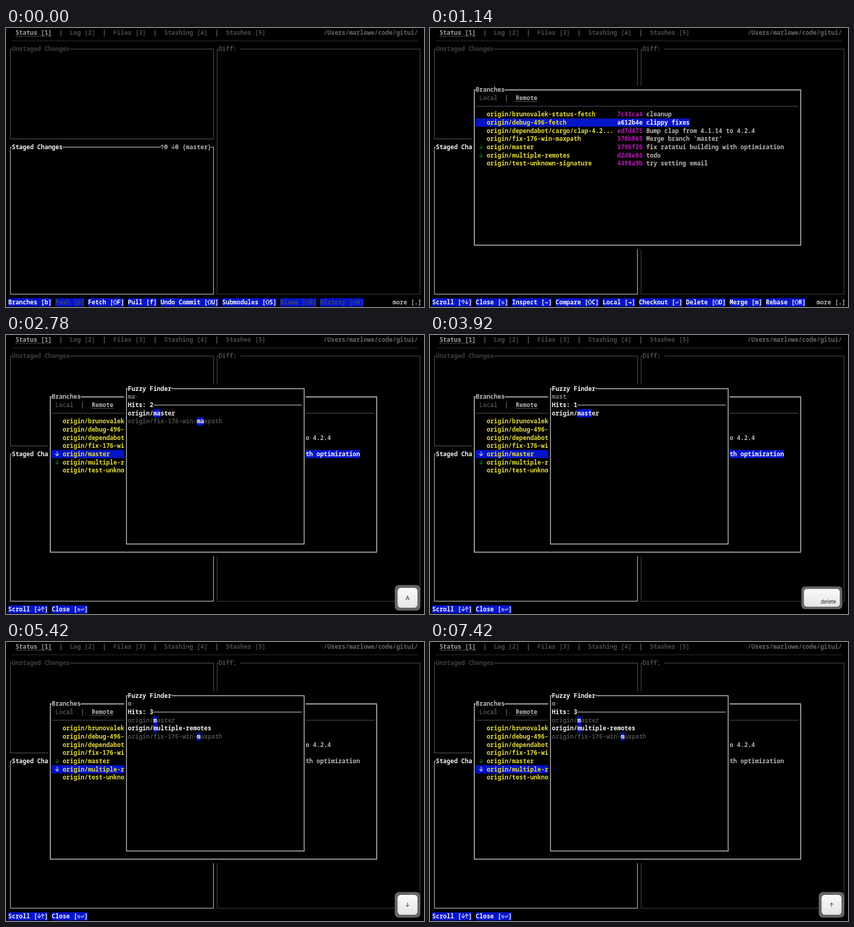
Animation of 800 by 534 pixels, one loop 8 s. Source, as an HTML page with a canvas:

```html
<!DOCTYPE html>
<html lang="en">
<head>
<meta charset="utf-8">
<title>Terminal branch finder</title>
<style>
html, body { margin: 0; width: 100%; height: 100%; overflow: hidden; background: #000; }
canvas { display: block; width: 800px; height: 534px; }
</style>
</head>
<body>
<canvas id="stage" width="800" height="534"></canvas>
<script>
const ctx = document.getElementById('stage').getContext('2d');
const LOOP = 8000, CW = 6.94, RH = 15.64, X0 = 4.3, Y0 = 9;
const MONO = '"Noto Sans Mono", "DejaVu Sans Mono", monospace';
const SYMBOLS = '"DejaVu Sans Mono", "DejaVu Sans", "Noto Sans Mono", monospace';
const ARROWS = 'Inter, "DejaVu Sans", sans-serif';
const BLUE = '#0414c8', WHITE = '#f2f2f2', LIGHT = '#b4b4b4', DIM = '#4a4a4a', FAINT = '#3e3e3e',
  YELLOW = '#e2da3e', MAGENTA = '#b818b8', GREEN = '#168a1c';

const BRANCHES = [
  ['brunovalek-status-fetch', '7c41ca4', 'cleanup'],
  ['debug-496-fetch', 'a612b4e', 'clippy fixes'],
  ['dependabot/cargo/clap-4.2...', 'ed7d475', 'Bump clap from 4.1.14 to 4.2.4'],
  ['fix-176-win-maxpath', '378b865', "Merge branch 'master'"],
  ['master', '379bf26', 'fix ratatui building with optimization', true],
  ['multiple-remotes', 'd2d8e86', 'todo', true],
  ['test-unknown-signature', '4498a9b', 'try setting email']
];
const HITS = ['master', 'multiple-remotes', 'fix-176-win-maxpath'];

// A leading "-" marks a disabled command.
const BARS = {
  status: ['Branches [b]', '-Push [p]', 'Fetch [⇧F]', 'Pull [f]', 'Undo Commit [⇧U]',
    'Submodules [⇧S]', '-Blame [⇧B]', '-History [⇧H]'],
  branches: ['Scroll [↑↓]', 'Close [⎋]', 'Inspect [→]', 'Compare [⇧C]', 'Local [⇥]',
    'Checkout [⏎]', 'Delete [⇧D]', 'Merge [m]', 'Rebase [⇧R]'],
  finder: ['Scroll [↓↑]', 'Close [⎋⏎]']
};

// time, view, query, chosen hit, key, key scale
const STEPS = [
  [0, 'status', '', 0, '', 1],
  [70, 'branches', '', 0, 'B', 1],
  [1140, 'branches', '', 0, '', 1],
  [1420, 'branches', '', 0, 'F', .92],
  [1490, 'finder', '', 0, 'F', 1],
  [2210, 'finder', '', 0, 'M', .92],
  [2280, 'finder', 'm', 0, 'M', .97],
  [2350, 'finder', 'm', 0, 'M', 1],
  [2710, 'finder', 'ma', 0, 'A', .96],
  [2780, 'finder', 'ma', 0, 'A', 1],
  [2850, 'finder', 'mas', 0, 'S', .96],
  [2920, 'finder', 'mast', 0, 'T', .97],
  [3070, 'finder', 'mast', 0, 'T', 1],
  [3920, 'finder', 'mast', 0, 'delete', .89],
  [4000, 'finder', 'mas', 0, 'delete', .95],
  [4070, 'finder', 'mas', 0, 'delete', 1],
  [4140, 'finder', 'ma', 0, 'delete', .96],
  [4210, 'finder', 'ma', 0, 'delete', 1],
  [4280, 'finder', 'm', 0, 'delete', .96],
  [4350, 'finder', 'm', 0, 'delete', 1],
  [5350, 'finder', 'm', 1, '↓', .96],
  [5420, 'finder', 'm', 1, '↓', 1],
  [6350, 'finder', 'm', 2, '↓', .96],
  [6420, 'finder', 'm', 2, '↓', 1],
  [7280, 'finder', 'm', 2, '↑', .9],
  [7350, 'finder', 'm', 1, '↑', .96],
  [7420, 'finder', 'm', 1, '↑', 1]
];

const colX = c => X0 + c * CW;
const rowY = r => Y0 + r * RH;

function fill(c, r, cols, rows, color) {
  ctx.fillStyle = color;
  ctx.fillRect(colX(c), rowY(r) - RH / 2, cols * CW, rows * RH);
}

function glyphFont(ch, weight) {
  if ('↑↓⇧'.includes(ch)) return `500 12px ${ARROWS}`;
  return ch < '\u0100' ? `${weight} 11.57px ${MONO}` : `${weight} 11px ${SYMBOLS}`;
}

function text(c, r, str, color, weight = 600) {
  ctx.fillStyle = color;
  ctx.textAlign = 'center';
  ctx.textBaseline = 'alphabetic';
  [...str].forEach((ch, i) => {
    ctx.font = glyphFont(ch, weight);
    ctx.fillText(ch, colX(c + i + .5), rowY(r) + 4);
  });
}

function line(points, color, width) {
  ctx.strokeStyle = color;
  ctx.lineWidth = width;
  ctx.beginPath();
  points.forEach(([x, y]) => ctx.lineTo(x, y));
  ctx.stroke();
}

function rule(r, from, to, color, width = 1) {
  line([[colX(from), rowY(r)], [colX(to), rowY(r)]], color, width);
}

function underline(c, r, n, color) {
  ctx.setLineDash([1.5, 1]);
  line([[colX(c), rowY(r) + 6.5], [colX(c + n), rowY(r) + 6.5]], color, 1);
  ctx.setLineDash([]);
}

// Box through cell centres, its top edge open behind the title.
function box(c0, r0, c1, r1, title, color, titleColor, width, weight = 700) {
  const l = colX(c0 + .6), r = colX(c1 + .6), t = rowY(r0), b = rowY(r1);
  line([[colX(c0 + 1 + title.length), t], [r, t], [r, b], [l, b], [l, t], [colX(c0 + 1), t]], color, width);
  text(c0 + 1, r0, title, titleColor, weight);
}

function drawBar(view) {
  let c = 0;
  for (const item of BARS[view]) {
    const off = item[0] === '-', label = off ? item.slice(1) : item;
    fill(c, 33, label.length, 1, BLUE);
    text(c, 33, label, off ? '#3a4468' : WHITE);
    c += label.length + 1;
  }
  if (view !== 'finder') text(106, 33, 'more [.]', LIGHT);
}

function drawStatus() {
  let c = 2;
  ['Status [1]', 'Log [2]', 'Files [3]', 'Stashing [4]', 'Stashes [5]'].forEach((tab, i) => {
    if (i) text(c - 3, 0, '|', '#686868');
    text(c, 0, tab, i ? DIM : '#a0a0a0');
    if (!i) underline(c, 0, tab.length, '#909090');
    c += tab.length + 5;
  });
  text(87, 0, '/Users/marlowe/code/gitui/', '#646464');
  rule(1, 1, 113, '#343434');
  box(0, 2, 56, 13, 'Unstaged Changes', '#505050', FAINT, 1.2, 600);
  box(57, 2, 113, 32, 'Diff: ', '#464646', DIM, 1.2, 600);
  box(0, 14, 56, 32, 'Staged Changes', '#a8a8a8', WHITE, 1.4);
  fill(42, 14, 14, 1, '#000');
  text(42, 14, '↑0 ↓0 {master}', '#b0b0b0');
}

function drawBranches(selected) {
  fill(11, 7, 91, 20, '#000');
  box(11, 7, 101, 26, 'Branches', '#b8b8b8', '#b8b8b8', 1.8);
  text(13, 8, 'Local', DIM);
  text(20, 8, '|', '#686868');
  text(23, 8, 'Remote', '#b0b0b0');
  underline(23, 8, 6, '#a0a0a0');
  rule(9, 12, 101, '#5c5c5c', 1.2);
  BRANCHES.forEach(([name, hash, message, tracked], i) => {
    const r = 10 + i, on = name === selected;
    if (on) fill(12, r, 47 + message.length, 1, BLUE);
    if (tracked) text(13, r, '↓', on ? WHITE : GREEN);
    text(15, r, 'origin/' + name, YELLOW);
    text(51, r, hash, on ? WHITE : MAGENTA);
    text(59, r, message, on ? WHITE : LIGHT, on ? 700 : 600);
  });
}

function drawFinder(query, hits, chosen) {
  const bottom = query ? 25 : 8;
  fill(32, 6, 50, bottom - 5, '#000');
  box(32, 6, 81, bottom, 'Fuzzy Finder', '#c8c8c8', WHITE, 1.5);
  if (!query) return text(33, 7, 'start typing..', FAINT);
  text(33, 7, query, '#808080');
  text(33 + query.length, 7, '·', DIM);
  text(33, 8, 'Hits: ' + hits.length, WHITE, 700);
  rule(8, 40, 81, '#c0c0c0', 1.4);
  hits.forEach((name, i) => {
    const full = 'origin/' + name, at = full.indexOf(query), r = 9 + i;
    text(33, r, full, i === chosen ? WHITE : DIM, i === chosen ? 700 : 600);
    fill(33 + at, r, query.length, 1, BLUE);
    text(33 + at, r, query, WHITE, 700);
  });
}

function roundRect(x, y, w, h, radius, style) {
  ctx.fillStyle = style;
  ctx.beginPath();
  ctx.roundRect(x, y, w, h, radius);
  ctx.fill();
}

function drawKey(key, scale) {
  const wide = key === 'delete', w = wide ? 88 : 49, h = 49;
  ctx.save();
  ctx.translate(wide ? 750 : 768.5, 503);
  ctx.scale(scale, scale);
  roundRect(-w / 2, -h / 2, w, h, 8, '#666');
  const cap = ctx.createLinearGradient(0, -19, 0, 19);
  cap.addColorStop(0, '#fafafa');
  cap.addColorStop(1, '#e4e4e4');
  roundRect(-w / 2 + 5.5, -h / 2 + 5.5, w - 11, h - 11, 6, cap);
  ctx.fillStyle = '#2a2a2a';
  ctx.textBaseline = 'alphabetic';
  ctx.textAlign = wide ? 'right' : 'center';
  ctx.font = `${wide ? 11.5 : 11}px Inter, Roboto, "DejaVu Sans", sans-serif`;
  ctx.fillText(key, wide ? 31 : 0, wide ? 12 : 4);
  ctx.restore();
}

function draw([, view, query, chosen, key, scale]) {
  ctx.fillStyle = '#000';
  ctx.fillRect(0, 0, 800, 534);
  drawStatus();
  const hits = HITS.filter(name => name.includes(query));
  if (view !== 'status') drawBranches(query ? hits[chosen] : 'debug-496-fetch');
  if (view === 'finder') drawFinder(query, hits, chosen);
  drawBar(view);
  if (key) drawKey(key, scale);
}

const start = performance.now();
let shown;
function tick() {
  const t = (performance.now() - start) % LOOP;
  const step = STEPS.findLast(s => s[0] <= t) || STEPS[0];
  if (step !== shown) draw(shown = step);
  requestAnimationFrame(tick);
}
tick();
</script>
</body>
</html>
```
